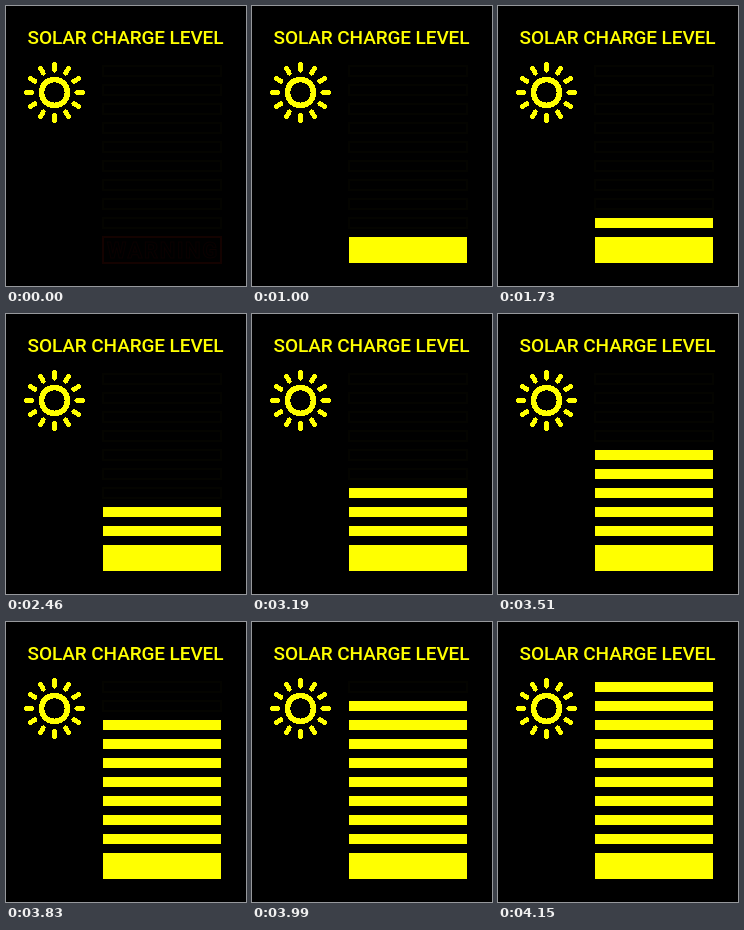
Recreate the animation shown at these times as an HTML page. Size 240 px wide and 280 px high, loop 7.15 s.

```html
<!DOCTYPE html>
<html lang="en">
<head>
<meta charset="utf-8">
<title>Solar charge level</title>
<style>
  html, body { margin: 0; width: 100%; height: 100%; overflow: hidden; background: #000; }
  svg { display: block; width: 240px; height: 280px; }
  text { font-family: Roboto, "Liberation Sans", sans-serif; }
  .title { font-size: 19px; font-weight: 500; letter-spacing: -.1px; fill: #ff0; }
  .warning { font-size: 22px; font-weight: 700; letter-spacing: 1.7px; fill: none; stroke: #0b0100; }
  .sun { fill: none; stroke: #ff0; stroke-linecap: round; shape-rendering: crispEdges; }
  .slot { fill: none; stroke: #040400; stroke-width: 2; }
  .slot.low { stroke: #140200; }
  .bar { fill: #ff0; }
</style>
</head>
<body>
<svg viewBox="0 0 240 280">
  <text class="title" x="119.5" y="38" text-anchor="middle">SOLAR CHARGE LEVEL</text>
  <g class="sun" id="sun" transform="translate(48.5 86.5)">
    <circle r="13" stroke-width="5.6"/>
  </g>
  <g id="meter"></g>
</svg>
<script>
  const LOOP = 7150;
  const steps = [1000, 1730, 2460, 3190, 3350, 3510, 3670, 3830, 3990, 4150];
  const sun = document.getElementById('sun');
  const meter = document.getElementById('meter');

  function add(parent, tag, attrs) {
    const el = document.createElementNS('http://www.w3.org/2000/svg', tag);
    for (const key in attrs) el.setAttribute(key, attrs[key]);
    return parent.appendChild(el);
  }

  for (let angle = 0; angle < 360; angle += 30) {
    add(sun, 'path', { d: 'M0-22.4V-28', 'stroke-width': 4.8, transform: `rotate(${angle})` });
  }

  // Bars from the bottom up; the lowest one is taller.
  const cells = steps.map((_, i) => {
    const box = { x: 97, y: 231 - 19 * i, width: 118, height: i ? 10 : 26 };
    const empty = add(meter, 'g', {});
    add(empty, 'rect', { class: i ? 'slot' : 'slot low', ...box });
    const bar = add(meter, 'rect', { class: 'bar', ...box });
    return { empty, bar };
  });

  // Faint unlit label inside the lowest slot.
  add(cells[0].empty, 'text', { class: 'warning', x: 157, y: 252, 'text-anchor': 'middle' })
    .textContent = 'WARNING';

  const show = (el, on) => el.setAttribute('visibility', on ? 'visible' : 'hidden');

  function draw(t) {
    cells.forEach(({ empty, bar }, i) => {
      const lit = t >= steps[i];
      show(bar, lit);
      show(empty, !lit);
    });
  }

  let start = null;
  function tick(now) {
    if (start === null) start = now;
    draw((now - start) % LOOP);
    requestAnimationFrame(tick);
  }
  draw(0);
  requestAnimationFrame(tick);
</script>
</body>
</html>
```
